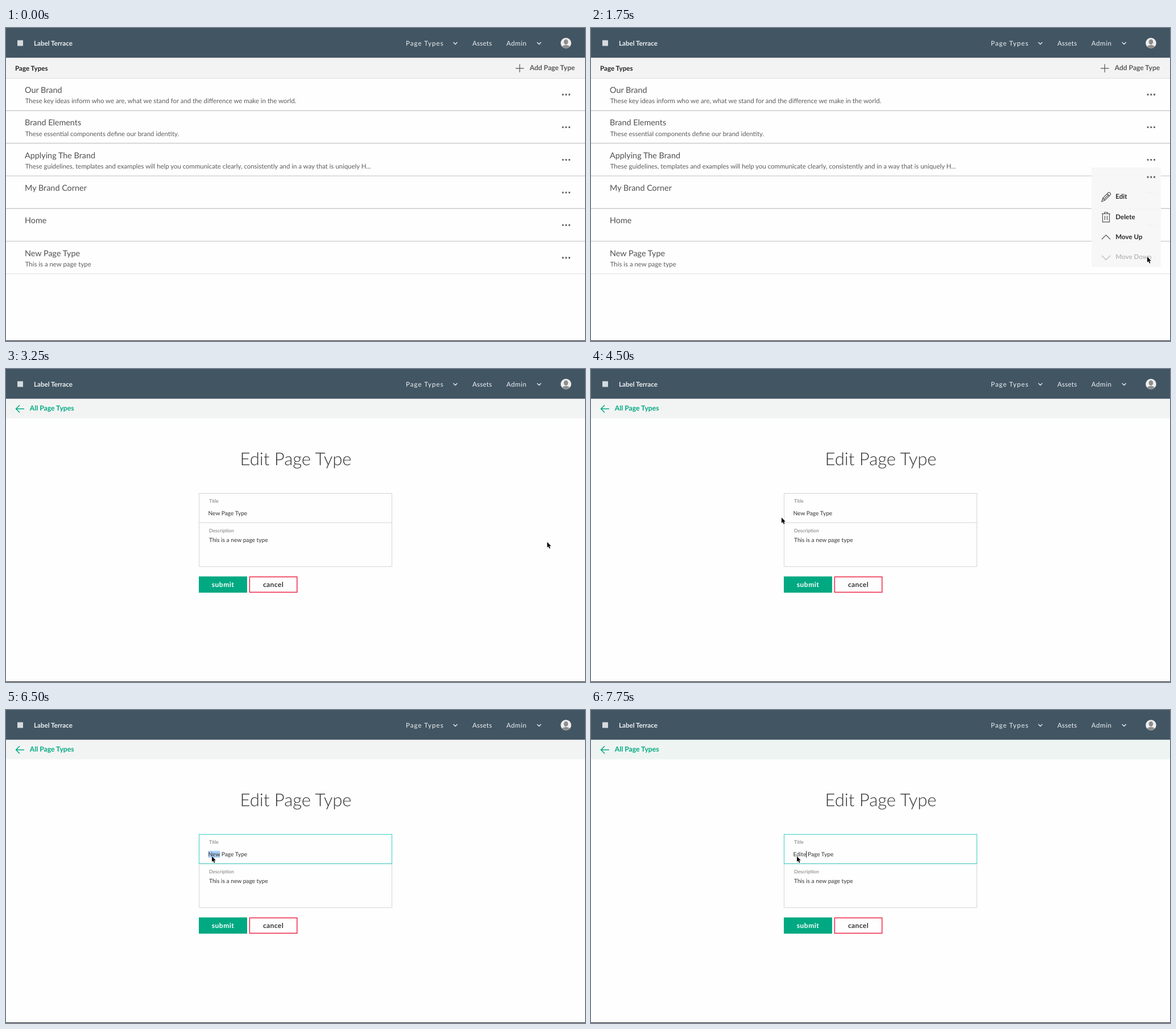
These frames come from a looping animation (1018x550 px, 8 s). An HTML page:

```html
<!DOCTYPE html>
<html lang="en">
<head>
<meta charset="utf-8">
<title>Edit Page Type</title>
<style>
  html, body { margin: 0; height: 100%; overflow: hidden; background: #fefefe; }
  svg { display: block; width: 100vw; height: 100vh; fill: none;
        font-family: Lato, "Open Sans", sans-serif; text-rendering: geometricPrecision; }
  text { fill: #444; white-space: pre; }
  .nav { fill: #eef1f3; font-size: 11.6px; }
  .title { font-size: 14.4px; fill: #505050; }
  .desc { font-size: 11.42px; fill: #5c5c5c; }
  .bold { font-weight: 700; font-size: 11.6px; fill: #333; }
  .label { font-size: 8.6px; fill: #777; }
  .input { font-size: 10.2px; fill: #333; }
  .button { font-size: 12px; font-weight: 700; text-anchor: middle; }
  .icon { stroke: #555; stroke-width: 1.2; }
  .dots { fill: #5c5c5c; }
</style>
</head>
<body>
<svg viewBox="0 0 1018 550">
  <defs>
    <path id="dots" d="M977.7-1.4h2.800v2.800h-2.800zM983.400-1.400h2.800v2.800h-2.800zM989.100-1.400h2.800v2.800h-2.800z"/>
    <clipPath id="face"><circle cx="984.5" cy="26.5" r="9"/></clipPath>
  </defs>
  <rect width="1018" height="550" fill="#fefefe"/>
  <rect width="1018" height="52.5" fill="#425563"/>
  <rect x="20" y="21.5" width="10" height="10" fill="#d5dadd"/>
  <text class="nav" x="49" y="30.7" font-weight="700">Label Terrace</text>
  <text class="nav" x="703" y="30.7" letter-spacing="1">Page Types</text>
  <text class="nav" x="820" y="30.7" letter-spacing=".2">Assets</text>
  <text class="nav" x="879.7" y="30.7" letter-spacing=".6">Admin</text>
  <path d="M786.5 25l3.5 3.5 3.5-3.5M933.8 25l3.5 3.5 3.5-3.5" stroke="#e6eaec" stroke-width="1.3"/>
  <circle cx="984.5" cy="26.5" r="9.3" fill="#eee"/>
  <g clip-path="url(#face)" fill="#8d8d8d">
    <ellipse cx="984.5" cy="24.5" rx="3.8" ry="4.6"/>
    <ellipse cx="984.5" cy="35" rx="7.5" ry="5.2"/>
  </g>

  <g id="list">
    <rect y="52.5" width="1018" height="36" fill="#f3f3f3"/>
    <path d="M0 88.5H1018" stroke="#dedede"/>
    <text class="bold" x="16" y="74.5" style="fill:#222">Page Types</text>
    <path class="icon" d="M896 70.8h14.5M903.2 63.5v14.5"/>
    <text class="bold" x="920.7" y="73.7" style="font-size:12.1px;fill:#5a5a5a">Add Page Type</text>
    <g id="rows"></g>
    <g id="menu">
      <rect x="880" y="245" width="122" height="175" fill="#f7f7f7" opacity=".96"/>
      <use class="dots" href="#dots" y="262"/>
      <rect id="hover" x="880" width="122" height="35.3" fill="#e8e8e8"/>
      <path class="icon" d="M898 305l1.8-6 10-10q1.2-.8 2.3.3l1.2 1.3q1 1.2.2 2.2l-10 10zM899.8 299l4 4M902.5 300.5l8-8M907.5 291.5l3.8 3.8"/>
      <path class="icon" d="M897.8 326.5h15.4M902.5 326.5v-2.3h6v2.3M899.5 326.5v14.3h12v-14.3M903.5 330v7.5M907.5 330v7.5"/>
      <path class="icon" d="M898 371.2l7.5-7.3 7.5 7.3"/>
      <path class="icon" d="M898 400l7.5 7.3 7.5-7.3" style="stroke:#bbb"/>
      <g id="items"></g>
    </g>
  </g>

  <g id="form">
    <rect id="bar" y="52.5" width="1018" height="34"/>
    <path d="M32 70H17.5M24 63.5L17.5 70l6.5 6.5" stroke="#01a982" stroke-width="1.5"/>
    <text class="bold" x="41.7" y="73.3" style="font-size:12.2px;fill:#01a982">All Page Types</text>
    <text x="509.5" y="168.5" font-size="31" font-weight="300" text-anchor="middle" style="fill:#333">Edit Page Type</text>
    <path d="M339.5 218.5h339v128.7h-339zM339.5 270h339" stroke="#d4d4d4"/>
    <rect id="focus" x="339.5" y="218.5" width="339" height="51.5" stroke="#3bcfc4"/>
    <text class="label" x="357" y="235">Title</text>
    <rect id="mark" x="355.5" y="247.5" height="12" fill="#a9cdf5"/>
    <text class="input" id="field" x="355.5" y="257.3"></text>
    <path id="caret" d="M0 247.5v12" stroke="#222"/>
    <text class="label" x="357" y="286.7">Description</text>
    <text class="input" x="357" y="304">This is a new page type</text>
    <rect x="339" y="364.5" width="85" height="28.5" fill="#01a982"/>
    <text class="button" x="381.5" y="383" letter-spacing=".5" style="fill:#fff">submit</text>
    <rect x="428.3" y="365.3" width="83.4" height="27" stroke="#ee3350" stroke-width="1.6"/>
    <text class="button" x="470" y="383" letter-spacing=".4" style="fill:#333">cancel</text>
  </g>

  <path d="M0 549.5H1018" stroke="#222"/>
  <path id="cursor" d="M0 0v9.8l2.2-2 1.6 3.8 1.7-.7-1.6-3.7h3z" fill="#000" stroke="#fff" stroke-width=".8" paint-order="stroke"/>
</svg>
<script>
const $ = id => document.getElementById(id);
const show = (id, on) => $(id).style.display = on ? '' : 'none';

const pages = [
  ['Our Brand', 'These key ideas inform who we are, what we stand for and the difference we make in the world.'],
  ['Brand Elements', 'These essential components define our brand identity.'],
  ['Applying The Brand', 'These guidelines, templates and examples will help you communicate clearly, consistently and in a way that is uniquely H...'],
  ['My Brand Corner', ''],
  ['Home', ''],
  ['New Page Type', 'This is a new page type']
];
$('rows').innerHTML = pages.map(([title, desc], i) => `<g transform="translate(0 ${i * 57.35})">
  <text class="title" x="33" y="114">${title}</text>
  <text class="desc" x="33.7" y="132.2">${desc}</text>
  <use class="dots" href="#dots" y="117"/>
  <path d="M0 145.2H1018" stroke="${i < 5 ? '#cbcbcb' : '#dcdcdc'}" stroke-width="${i < 5 ? 1.4 : 1}"/></g>`).join('');

const rowY = i => 279 + i * 35.4;
$('items').innerHTML = ['Edit', 'Delete', 'Move Up', 'Move Down'].map((name, i) =>
  `<text class="bold" x="922.3" y="${rowY(i) + 21.1}">${name}</text>`).join('');
const items = [...$('items').children];

// Each step changes part of the state from its time on.
const start = { at: null, menu: 0, row: 0, hover: 0, form: 0, focus: 0,
                text: 'New Page Type', marked: 0, caret: 0, bar: '#f2f4f3' };
const steps = [
  [500, { at: [888, 361] }],
  [1000, { at: [934, 391] }],
  [1250, { at: [961, 402] }],
  [1500, { at: [978, 402] }],
  [1750, { menu: 1 }],
  [2250, { at: [951, 293], hover: .5 }],
  [2500, { at: [953, 330], row: 1 }],
  [2750, { at: [951.5, 304], row: 0 }],
  [3000, { hover: 1 }],
  [3250, { form: 1 }],
  [3750, { at: [946, 309] }],
  [4000, { at: [498, 293] }],
  [4250, { at: [345, 267] }],
  [4500, { at: [335, 261] }],
  [4750, { at: [363, 252] }],
  [5000, { focus: .5 }],
  [5250, { focus: 1, marked: 13 }],
  [6250, { at: [362, 257] }],
  [6500, { marked: 3 }],
  [7000, { text: 'E Page Type', marked: 0, caret: 1 }],
  [7250, { text: 'Edi Page Type', caret: 3 }],
  [7500, { text: 'Edit Page Type', caret: 4, bar: '#edf4f1' }],
  [7750, { text: 'Edite Page Type', caret: 5 }]
];

function draw(t) {
  const s = Object.assign({}, start, ...steps.filter(p => p[0] <= t).map(p => p[1]));
  show('list', !s.form);
  show('form', s.form);
  show('menu', s.menu);
  show('cursor', s.at);
  if (s.at) $('cursor').setAttribute('transform', `translate(${s.at})`);
  $('hover').setAttribute('y', rowY(s.row));
  $('hover').style.opacity = s.hover;
  items.forEach((item, i) => item.style.fill = i === 3 ? '#bbb' : s.hover && i === s.row ? '#000' : '#2a2a2a');
  $('focus').style.opacity = s.focus;
  $('bar').style.fill = s.bar;
  $('field').textContent = s.text;
  const width = n => n && s.form ? $('field').getSubStringLength(0, n) : 0;
  $('mark').setAttribute('width', width(s.marked));
  show('caret', s.caret);
  $('caret').setAttribute('transform', `translate(${355.8 + width(s.caret)})`);
}

const begin = performance.now();
function tick() {
  draw((performance.now() - begin) % 8000);
  requestAnimationFrame(tick);
}
tick();
</script>
</body>
</html>
```
